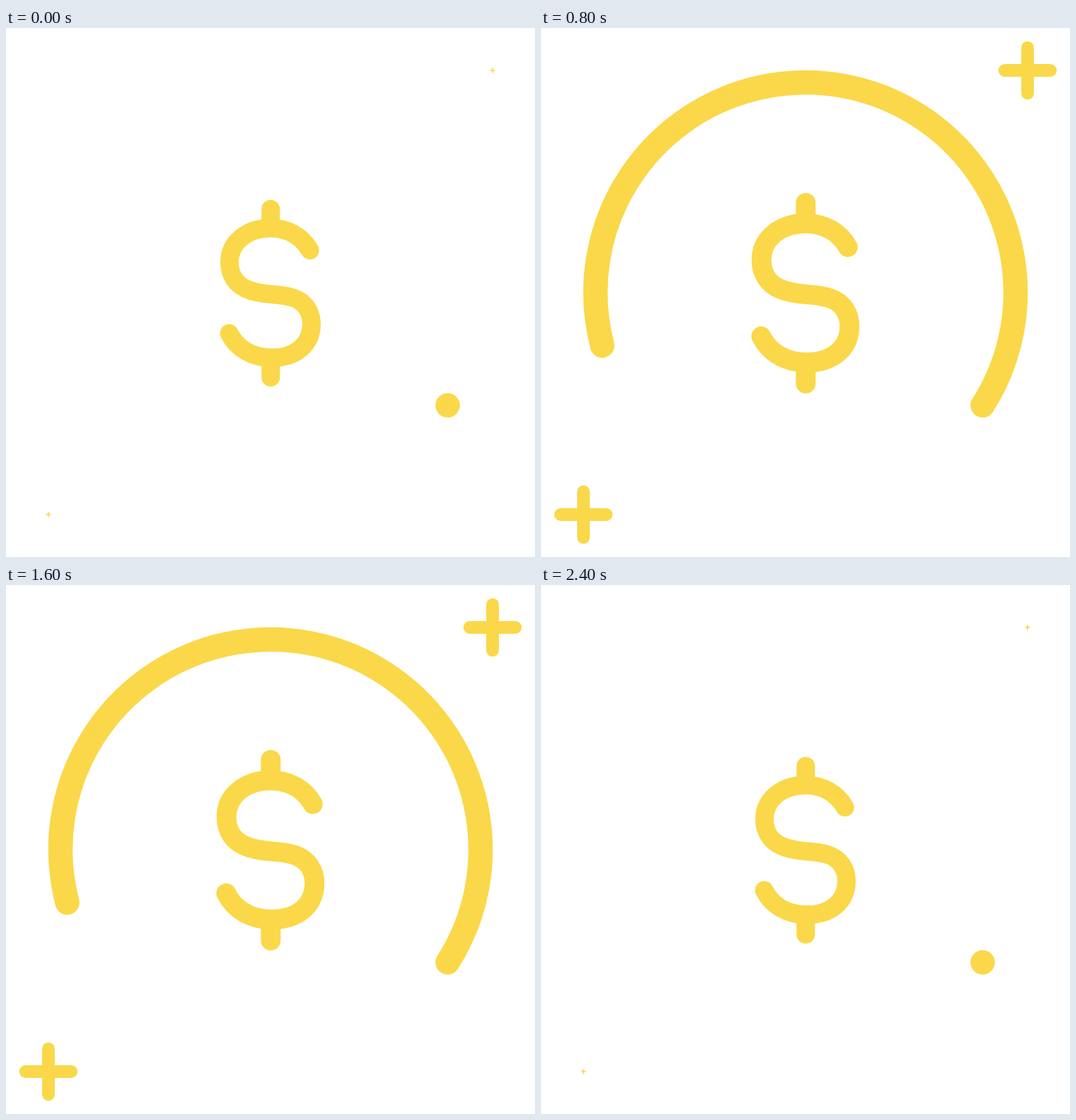
Recreate the animation shown at these times as an HTML page. Size 748x748 px, loop 2420 ms.

```html
<!DOCTYPE html>
<html lang="en">
<head>
<meta charset="utf-8">
<style>
  html, body { margin: 0; width: 100%; height: 100%; overflow: hidden; background: #fff; }
  svg { display: block; width: 100%; height: 100%; fill: none; stroke: #fad849; stroke-linecap: round; }
</style>
</head>
<body>
<svg viewBox="0 0 748 748">
  <circle id="ring" r="297" pathLength="360" stroke-width="34.5"
    transform="translate(374 374) rotate(32.5) scale(1 -1)"/>
  <g id="dollar" stroke-width="26">
    <path d="M429.7 314.3C419 295 399 283 374 283C341 283 316 303 316 331
      C316 350 326 363 340 369C351 374 363 375.5 375 376.5
      C387 377.3 397 378.5 406 381.5C423 387 432 402 432 418.5
      C432 447 410 466.3 376 466.3C348 466.3 326 453 315.7 431.8"/>
    <path d="M374.3 256V283M374.3 466V494"/>
  </g>
  <path class="plus" data-at="688 60" d="M-47 0H47M0-47V47" stroke-width="26"/>
  <path class="plus" data-at="60 688" d="M-47 0H47M0-47V47" stroke-width="26"/>
</svg>
<script>
  const LOOP = 2420, HALF = 1200, STEP = 20;
  const ring = document.getElementById('ring');
  const dollar = document.getElementById('dollar');
  const pluses = document.querySelectorAll('.plus');

  function draw(now) {
    // The motion advances in 20 ms steps, out and back at constant speed.
    const t = Math.floor((now % LOOP) / STEP) * STEP;
    const p = 1 - Math.abs(t - HALF) / HALF;

    ring.setAttribute('stroke-dasharray', `${Math.max(0.01, 340.7 * p)} 400`);
    dollar.setAttribute('transform',
      `translate(374 375) scale(${1 + p / 9}) translate(-374 -375)`);
    for (const plus of pluses) {
      plus.setAttribute('transform',
        `translate(${plus.dataset.at}) scale(${(1 + 15 * p) / 16})`);
    }
  }

  const start = performance.now();
  function tick() {
    draw(performance.now() - start);
    requestAnimationFrame(tick);
  }
  tick();
</script>
</body>
</html>
```
